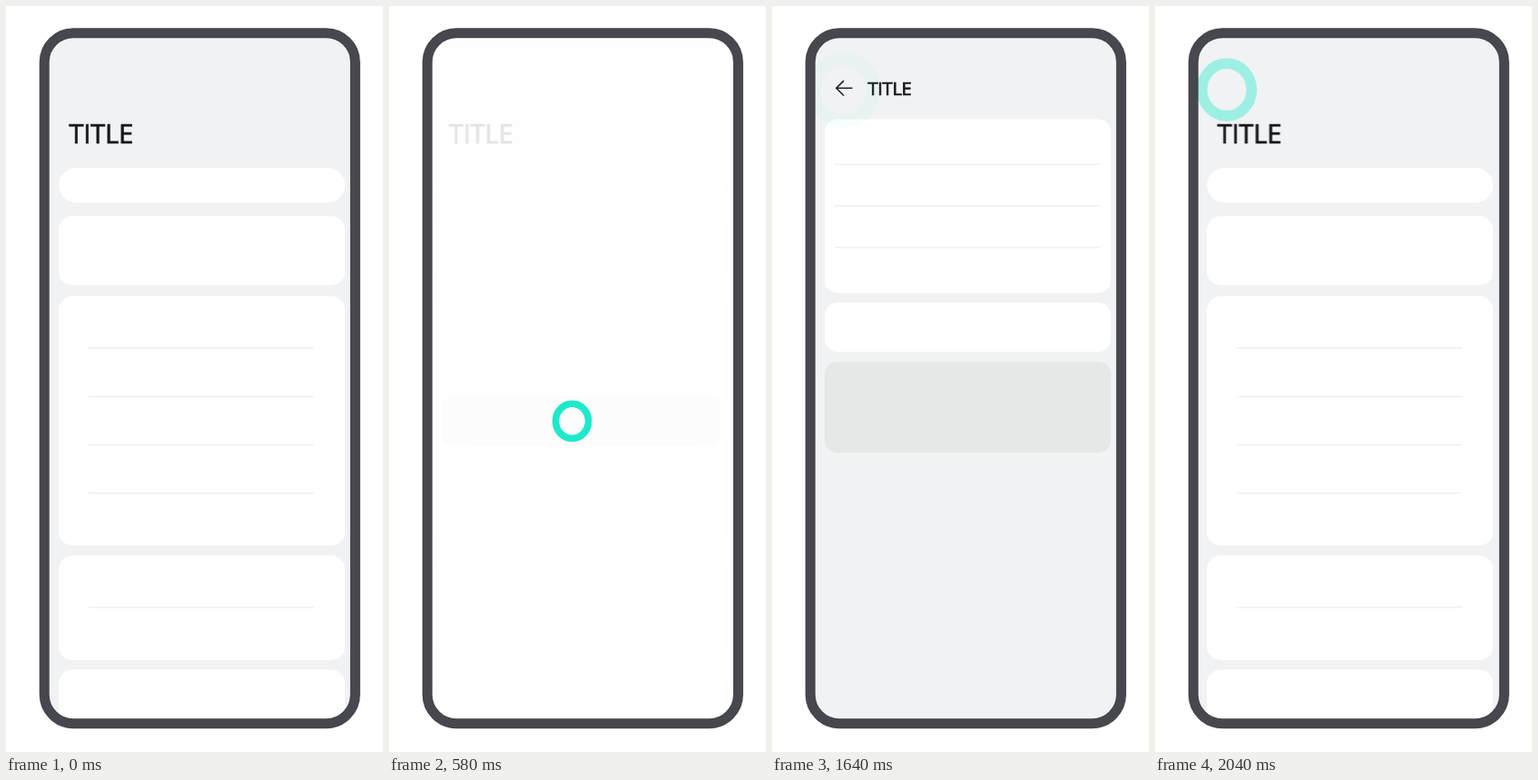
An HTML page that plays this animation: 415x820 px, repeating every 2.06 s.

```html
<!DOCTYPE html>
<html lang="en">
<head>
<meta charset="utf-8">
<title>Screen transition</title>
<style>
  html, body { margin: 0; width: 100%; height: 100%; overflow: hidden; background: #fff; }
  svg { display: block; width: 415px; height: 820px; }
  text { font-family: "Open Sans", "Noto Sans", sans-serif; fill: #18191c; stroke: #18191c; }

  .page, .slide, .press, .ring { animation: 2060ms linear infinite; }
  .list { animation-name: list-fade; }
  .list .slide { animation-name: list-slide; }
  .detail { animation-name: detail-fade; }
  .detail .slide { animation-name: detail-slide; }
  .press { animation-name: press; }
  .open { animation-name: tap-open; }
  .back { animation-name: tap-back; }

  .bg { fill: #f1f2f4; }
  .card { fill: #fff; }
  .muted { fill: #e6e8e7; }
  .rule { fill: none; stroke: #eeeff0; stroke-width: 1.4; }
  .ring ellipse { fill: none; stroke: #1ce9cb; stroke-width: 7.6; }
  .frame rect { fill: none; stroke-width: 11; stroke: #424349; }
  .frame rect + rect { stroke-width: 9; stroke: #47484e; }

  @keyframes list-fade {
    0%, 21.36% { opacity: 1; }
    29.13%, 88.35% { opacity: 0; }
    97.09%, 100% { opacity: 1; }
  }
  @keyframes list-slide {
    0%, 21.36% { transform: none; }
    29.13% { transform: translateX(-4px); }
    88.35% { transform: translateX(-14px); animation-timing-function: cubic-bezier(.2, .7, .3, 1); }
    100% { transform: translateX(-.7px); }
  }
  @keyframes detail-fade {
    0%, 32.04% { opacity: 0; }
    37.86%, 81.55% { opacity: 1; }
    87.38%, 100% { opacity: 0; }
  }
  @keyframes detail-slide {
    0%, 32.04% { transform: translateX(6px); animation-timing-function: cubic-bezier(.1, .8, .3, 1); }
    39.32%, 81.55% { transform: none; }
    87.38%, 100% { transform: translateX(10px); }
  }
  @keyframes press {
    0%, 14.56% { opacity: 0; }
    19.42%, 30% { opacity: 1; }
    32%, 100% { opacity: 0; }
  }
  @keyframes tap-open {
    0%, 12.4% { opacity: 0; transform: scale(1.86); }
    17.48%, 28.16% { opacity: 1; transform: none; }
    33.01%, 100% { opacity: 0; transform: scale(1.86); }
  }
  /* The loop restarts before this tap has fully faded. */
  @keyframes tap-back {
    0%, 79.4% { opacity: 0; transform: scale(1.86); }
    85.44%, 96.12% { opacity: 1; transform: none; }
    100% { opacity: .2; transform: scale(1.69); }
  }
</style>
</head>
<body>
<svg viewBox="0 0 415 820">
  <defs>
    <clipPath id="screen"><rect x="47" y="35" width="332" height="749" rx="28"/></clipPath>
  </defs>

  <g clip-path="url(#screen)">
    <g class="page list">
      <rect class="bg" x="47" y="35" width="332" height="749"/>
      <g class="slide">
        <text x="69.3" y="151.4" font-size="29.3" stroke-width=".6" letter-spacing="-.3">TITLE</text>
        <rect class="card" x="58" y="178" width="315" height="38" rx="19"/>
        <rect class="card" x="58" y="231" width="315" height="76" rx="15"/>
        <rect class="card" x="58" y="319" width="315" height="274" rx="15"/>
        <rect class="card" x="58" y="604" width="315" height="115" rx="15"/>
        <rect class="card" x="58" y="729.5" width="315" height="80" rx="15"/>
        <path class="rule" d="M91 376H339M91 429.5H339M91 482.5H339M91 535.5H339M91 661H339"/>
        <rect class="press" x="61.5" y="429.5" width="307" height="53" rx="12" fill-opacity=".118"/>
      </g>
    </g>

    <g class="page detail">
      <rect class="bg" x="47" y="35" width="332" height="749"/>
      <g class="slide">
        <path d="M88.5 90.3H71M79 82.1L70.8 90.3L79 98.5" fill="none" stroke="#222327" stroke-width="1.6"/>
        <text x="105.5" y="98.2" font-size="20.3" stroke-width=".7" letter-spacing="-.4">TITLE</text>
        <rect class="card" x="58" y="124.5" width="315" height="191" rx="14"/>
        <rect class="card" x="58" y="326" width="315" height="54" rx="14"/>
        <rect class="muted" x="58" y="391" width="315" height="100" rx="14"/>
        <path class="rule" d="M69 174H361M69 219.8H361M69 265.5H361"/>
      </g>
    </g>

    <g transform="translate(201.5 456.3)"><g class="ring open"><ellipse rx="17.9" ry="18.9"/></g></g>
    <g transform="translate(79 92)"><g class="ring back"><ellipse rx="17.9" ry="18.9"/></g></g>
  </g>

  <g class="frame">
    <rect x="42.2" y="29.7" width="342.2" height="759" rx="32"/>
    <rect x="42.2" y="29.7" width="342.2" height="759" rx="32"/>
  </g>
</svg>
</body>
</html>
```
